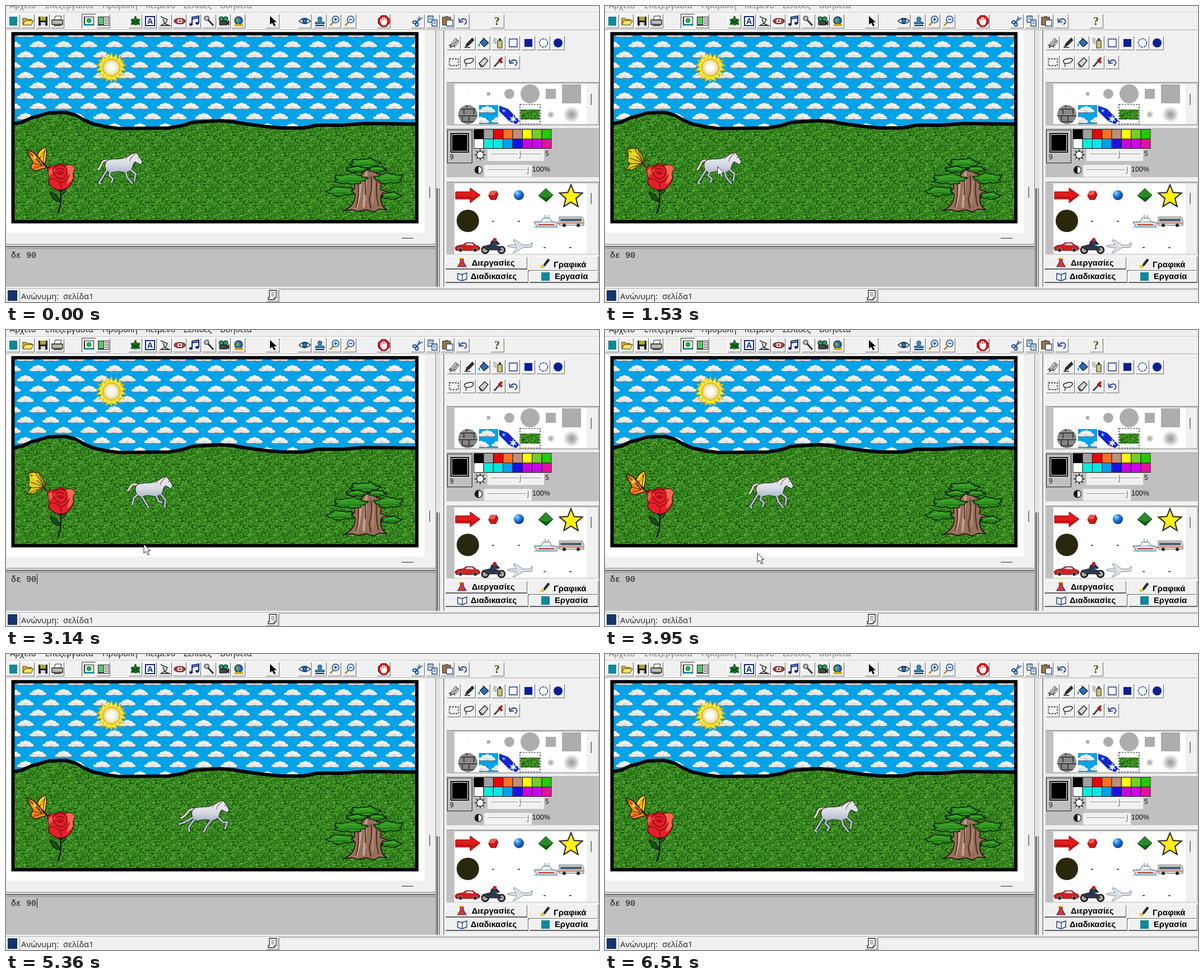
An HTML page with a canvas that plays this animation: 1058x529 px, repeating every 6570 ms.

```html
<!DOCTYPE html>
<html lang="el">
<head>
<meta charset="utf-8">
<title>Meadow</title>
<style>
html, body { margin: 0; width: 100%; height: 100%; overflow: hidden; background: #f0f0f0; }
canvas { display: block; }
</style>
</head>
<body>
<canvas id="stage" width="1058" height="529"></canvas>
<script>
const LOOP = 6570, W = 1058, H = 529;
const sheet = (w, h) => Object.assign(document.createElement('canvas'), { width: w, height: h });
const screen = document.getElementById('stage').getContext('2d');
const base = sheet(W, H);
let g = base.getContext('2d');

// ---------- helpers ----------
let seed = 7;
const rnd = () => (seed = (seed * 16807) % 2147483647) / 2147483647;

function rect(x, y, w, h, c) { g.fillStyle = c; g.fillRect(x, y, w, h); }
function fig(d, fill, line, lw = 1) {
  const p = typeof d === 'string' ? new Path2D(d) : d;
  if (fill) { g.fillStyle = fill; g.fill(p); }
  if (line) { g.strokeStyle = line; g.lineWidth = lw; g.stroke(p); }
}
function oval(x, y, rx, ry, fill, line, lw) {
  const p = new Path2D();
  p.ellipse(x, y, rx, ry, 0, 0, Math.PI * 2);
  fig(p, fill, line, lw);
}
function at(x, y, draw) { g.save(); g.translate(x, y); draw(); g.restore(); }
function text(s, x, y, font, c = '#111') { g.font = font; g.fillStyle = c; g.fillText(s, x, y); }
function bevel(x, y, w, h, down) {
  rect(x, y, w, h, down ? '#404040' : '#ffffff');
  rect(x + 1, y + 1, w - 1, h - 1, down ? '#ffffff' : '#6c6c6c');
  rect(x + 1, y + 1, w - 2, h - 2, '#f0f0f0');
}
function radial(x, y, r, ...stops) {
  const f = g.createRadialGradient(x, y, 0, x, y, r);
  stops.forEach((c, i) => f.addColorStop(i / (stops.length - 1), c));
  return f;
}
function star(x, y, n, r1, r2, fill, line, lw) {
  const p = new Path2D();
  for (let i = 0; i < n * 2; i++) {
    const a = i * Math.PI / n - Math.PI / 2, r = i % 2 ? r2 : r1;
    p.lineTo(x + r * Math.cos(a), y + r * Math.sin(a));
  }
  p.closePath();
  fig(p, fill, line, lw);
}

// ---------- textures ----------
function grassPattern() {
  const tile = sheet(46, 37), c = tile.getContext('2d');
  c.fillStyle = '#2f7f1a';
  c.fillRect(0, 0, 46, 37);
  const tones = ['#0d4204', '#1a5c0c', '#2b7616', '#3f9424', '#58ae36', '#74c44c'];
  for (let y = 0; y < 37; y += 1.4) for (let x = 0; x < 46; x += 1.5) {
    c.fillStyle = tones[Math.floor(rnd() * 6)];
    c.globalAlpha = .75;
    c.fillRect(x, y, 1.5, 1.4);
  }
  return g.createPattern(tile, 'repeat');
}
const grass = grassPattern();

function cloud(x, y) {
  at(x, y, () => {
    fig('M-15 4Q-15 0-10 0Q-9-5-4-4Q0-8 5-4Q9-5 10-1Q15 0 15 4Q8 7 0 5Q-8 7-15 4Z', '#f4f4f4');
    fig('M-11 3Q-8-1-4 2Q1-2 5 2Q9 0 12 3Z', '#dadada');
    fig('M-14 5Q-7 6.5 0 5Q8 6.5 15 5', null, '#7d8488', 1.4);
  });
}
function sky(x0, y0, x1, y1) {
  g.save();
  g.beginPath(); g.rect(x0, y0, x1 - x0, y1 - y0); g.clip();
  rect(x0, y0, x1 - x0, y1 - y0, '#00a2e8');
  for (let r = 0; r < 11; r++) for (let k = -1; k < 18; k++)
    cloud(11.5 + k * 45.4 + (r % 2 ? 0 : 23), 50 + r * 18.4);
  g.restore();
}

// ---------- page picture ----------
function sun() {
  star(188, 110, 18, 27.5, 18, '#ffd400', '#e09a18', .8);
  star(188, 110, 15, 24, 17, '#fff03a');
  oval(188, 110, 16, 16, radial(188, 110, 16, '#ffffff', '#fdfbf0', '#efe6c0', '#e8c020'), '#c89018', .8);
}
function rose() {
  fig('M97 327C98 345 99 355 92 371', null, '#081808', 2.4);
  fig('M96 350Q82 350 78 333Q92 333 96 350Z', '#174d18', '#061006', 1);
  fig('M98 338Q108 332 106 327M91 327Q97 335 104 327', null, '#0c240b', 2);
  fig('M74 292Q76 283 88 286Q97 278 105 285Q118 280 123 291Q118 299 121 306Q116 326 100 329Q83 329 76 316Q79 307 74 292Z', '#e3202a', '#3a0508', 1.2);
  fig('M106 286Q118 280 123 291Q117 298 120 307Q115 317 108 318Q115 302 106 286Z', '#f36a50');
  fig('M75 293Q83 287 88 294Q81 300 77 306Z', '#f4574c');
  fig('M83 291Q98 279 108 290Q111 303 100 309Q87 309 83 291M88 293Q99 287 104 294M77 309Q90 307 97 316Q108 314 114 301M97 316L99 328', null, '#7d0710', 1.4);
  fig('M90 297Q99 292 104 299Q96 306 90 297', '#b80d18');
}
function leaves(x, y, rx, ry, k) {
  const p = new Path2D();
  for (let i = 0; i < 40; i++) {
    const a = i * Math.PI / 20, r = 1 + .12 * Math.sin(5 * a + k) + .1 * Math.sin(11 * a + k * 2);
    p.lineTo(x + rx * r * Math.cos(a), y + ry * r * Math.sin(a));
  }
  p.closePath();
  fig(p, '#2f9420', '#0a1c06', 1.5);
  fig(`M${x - rx * .6} ${y - ry * .1}Q${x} ${y - ry * .9} ${x + rx * .5} ${y - ry * .2}`, null, '#4cb034', 1.6);
  fig(`M${x - rx * .7} ${y + ry * .6}Q${x} ${y + ry * .2} ${x + rx * .7} ${y + ry * .5}`, null, '#1c6414', 1.4);
}
function tree() {
  fig('M601 366C616 361 623 350 623 336L600 330L622 327L622 312L606 308L632 306L643 287L652 287L662 300L672 302L668 328L688 335L669 338C667 350 670 358 679 364L666 363L656 368L643 364L628 367L617 364Z', '#96705c', '#180b06', 1.5);
  fig('M643 295L638 360M633 310Q632 345 624 362', null, '#c8a490', 4);
  fig('M651 303Q655 325 648 345L651 362M628 315Q631 340 624 361M641 305L641 338M662 308Q659 338 665 358', null, '#4a2a20', 1.8);
  fig('M656 313L654 352', null, '#b58872', 3);
  leaves(640, 281, 25, 8, 1);
  leaves(626, 292, 18, 5, 3);
  leaves(662, 292, 15, 5, 0);
  leaves(614, 309, 28, 9, 2);
  leaves(683, 308, 24, 9, 4);
  leaves(597, 331, 23, 8, 5);
  leaves(687, 339, 17, 6, 1.5);
}
function picture() {
  rect(0, 43, 767, 383, '#f0f0f0');
  rect(1, 43, 746, 362, '#ffffff');
  sky(12, 50, 733, 235);
  const hill = 'M12 211L30 207L45 200L60 196L76 191L106 190L124 195L140 204L156 211L180 216L202 219L290 218L314 214L332 208L380 205L406 207L430 211L460 215L490 218L530 218L556 213L600 213L640 210L733 211';
  g.lineJoin = 'round';
  fig(hill + 'V386H12Z', grass);
  fig(hill, null, '#000', 6);
  g.lineJoin = 'miter';
  g.strokeStyle = '#000'; g.lineWidth = 6;
  g.strokeRect(12.5, 49.5, 720.5, 336);
  sun(); rose(); tree();
}

// ---------- window parts ----------
const glyph = {
  mark: () => rect(-7, -8, 14, 16, '#108898'),
  open: () => { fig('M-9-5H-3L-1-3H6V6H-9Z', '#e8b820', '#403000'); fig('M-9 7L-5-1H10L6 7Z', '#ffe468', '#403000'); },
  save: () => { rect(-8, -8, 16, 16, '#202020'); rect(-5, -8, 10, 7, '#a8a820'); rect(-4, 2, 8, 6, '#d8d8d8'); },
  print: () => { fig('M-6-2L-4-9H7L5-2Z', '#fff', '#222'); fig('M-10-2H9V6H-10Z', '#b8b8b8', '#222', 1.4); rect(-7, 6, 14, 3, '#555'); rect(3, 1, 4, 2, '#dd0'); },
  view: () => { rect(-9, -8, 18, 16, '#222'); rect(-7, -7, 15, 13, '#fff'); oval(0, -1, 4, 4, '#25b13d', '#085', 1); rect(-8, 5, 16, 3, '#2090a0'); },
  list: () => { rect(-10, -8, 20, 16, '#222'); rect(-9, -7, 9, 13, '#59c26a'); rect(1, -7, 8, 14, '#fff'); for (let y = -5; y < 6; y += 3) rect(2, y, 6, 1, '#333'); },
  turtle: () => { oval(0, 1, 7, 6, '#197c1e', '#052', 1); fig('M-8-3L8 6M8-3L-8 6M0-4V-9', null, '#0d5012', 3); },
  word: () => { fig('M-8-8H8V8H-8Z', '#fff', '#102a80', 2); text('A', -5, 5, 'bold 14px "Liberation Sans",sans-serif', '#102a80'); },
  lamp: () => fig('M-8-8L4-3L0 5L8 8H-8L-1 4L-4-4', '#d8e8d8', '#222', 1.4),
  pill: () => { oval(0, 0, 10, 5, '#c83838', '#222', 1.2); rect(-4, -3, 8, 6, '#eee'); rect(-2, -1, 4, 2, '#222'); },
  note: () => { fig('M-4 6V-7L8-9V4M-4-4L8-6', null, '#102a80', 2); oval(-6, 6, 3, 2.4, '#102a80'); oval(5, 4, 3, 2.4, '#102a80'); },
  mic: () => { fig('M-3-3L7 8', null, '#333', 3); oval(-5, -5, 4, 4, '#bbb', '#222', 1.2); },
  film: () => { fig('M-8-1H5V7H-8ZM5 2L9-1V7L5 5Z', '#444', '#111'); oval(-5, -4, 4, 4, '#20a060', '#111'); oval(3, -4, 4, 4, '#20a060', '#111'); },
  globe: () => { oval(0, -1, 7, 7, '#2b68c4', '#113', 1.2); fig('M-4-6Q4-4 1 1Q-3 5-5 0Z', '#55b23b'); rect(-7, 5, 15, 4, '#d0a820'); },
  arrow: () => fig('M-5-9V6L-1 3L2 9L5 8L2 2H7Z', '#000'),
  eye: () => { fig('M-10 0Q0-10 10 0Q0 9-10 0Z', '#e8f4ff', '#123', 1.4); oval(0, -.5, 4, 4, '#2878c0', '#012'); },
  stamp: () => { fig('M-3 2Q-2-2-4-5Q0-10 4-5Q2-2 3 2H8V5H-8V2Z', '#2c8cc8', '#135'); rect(-8, 7, 16, 2, '#135'); },
  zoomIn: () => { glyph.zoomOut(); fig('M2-6V0', null, '#234a90', 1.6); },
  zoomOut: () => { fig('M0 0L-8 8', null, '#b88a30', 3); oval(2, -3, 6, 6, '#d8f0ff', '#234a90', 1.6); fig('M-1-3H5', null, '#234a90', 1.6); },
  stop: () => { fig('M-4-10H4L10-4V4L4 10H-4L-10 4V-4Z', '#d81818', '#500', 1); fig('M-5 0V-4M-2 0V-7M1 0V-7M4 0V-5M-5 0Q-4 7 0 7Q5 7 5-1Z', '#fff', '#fff', 2); },
  cut: () => { fig('M8-6L-4 2M3-8L-2 4', null, '#2862a8', 2); oval(-6, 2, 3, 2.5, null, '#205090', 2); oval(-2, 6, 2.5, 3, null, '#205090', 2); },
  copy: () => { for (const k of [-4, 3]) { fig(`M${k - 5} ${k - 5}h9v11h-9z`, '#e6f4ff', '#1c407c', 1.3); fig(`M${k - 3} ${k - 2}h5m-5 3h5`, null, '#1c407c'); } },
  paste: () => { fig('M-9-7H5V7H-9Z', '#a87838', '#222', 1.2); rect(-5, -9, 6, 4, '#666'); fig('M-2-2H9V9H-2Z', '#fff', '#1c407c', 1.3); },
  undo: () => fig('M-7-5L-6 2L1 1M-5 0Q-1-6 5-3Q9 2 3 6', null, '#203c98', 1.8),
  help: () => text('?', -6, 7, 'bold 20px "Liberation Serif",serif', '#4a4a08'),
  brush: () => { fig('M-9 5Q-4 2-6 8Q0 3 2 8', null, '#222', 1.4); fig('M-6 3L3-8L6-6L-3 4ZM0 4L7-5L9-3L3 5Z', '#ddd', '#222'); },
  pen: () => { fig('M-6 7L-4 1L6-9L9-5L0 4Z', '#333', '#111'); fig('M-8 8H2', null, '#111', 1.4); },
  fill: () => { fig('M-6-1L1-8L9 0L1 7Z', '#2870b8', '#113', 1.2); fig('M-7 0Q-11 4-8 7Q-5 4-7 0', '#18a0e0'); fig('M-1-4V-10', null, '#222'); },
  spray: () => { fig('M-2-4H6V9H-2Z', '#c8c870', '#333', 1.2); rect(0, -8, 4, 4, '#333'); for (let i = 0; i < 6; i++) rect(-9 + i % 2 * 3, -9 + i * 1.7, 1.5, 1.5, '#333'); },
  box: () => fig('M-7-7H7V7H-7Z', '#f8f8ff', '#1830a0', 1.3),
  slab: () => rect(-7, -7, 14, 14, '#0b2090'),
  ring: () => { g.setLineDash([4, 1.5]); oval(0, 0, 7.5, 7.5, '#f4f8ff', '#1830a0', 1.4); g.setLineDash([]); },
  disc: () => oval(0, 0, 8, 8, '#0b2090'),
  pick: () => { g.setLineDash([3, 2]); fig('M-8-6H8V6H-8Z', null, '#111', 1.3); g.setLineDash([]); },
  lasso: () => fig('M-6 8Q-3 3-7 1Q-11-4-2-6Q9-9 8-3Q5 3-6 2', null, '#222', 1.4),
  rubber: () => fig('M-8 2L2-8L8-3L-1 8H-5ZM-8 2L-2 7', '#d4d4d4', '#222', 1.3),
  dropper: () => { fig('M-8 8L2-3', null, '#444', 3); fig('M0-5L6 1M2-3L6-8', null, '#b01818', 4); }
};
function buttons(y, h, list) {
  for (const [x, name] of list) {
    bevel(x, y, 25, h, name === 'view');
    at(x + 13, y + h / 2, glyph[name]);
  }
}
const row = (x, step, names) => names.split(' ').map((n, i) => [Math.round(x + i * step), n]);

function toolbar() {
  rect(0, 11, W, 1, '#c4c4c4');
  rect(0, 12, W, 1, '#ffffff');
  buttons(14, 26, [
    ...row(0, 26.3, 'mark open save print'), ...row(135, 26.3, 'view list'),
    ...row(218, 26.3, 'turtle word lamp pill note mic film globe'), [463, 'arrow'],
    ...row(520, 26.7, 'eye stamp zoomIn zoomOut'), [661, 'stop'],
    ...row(722, 26.5, 'cut copy paste undo'), [864, 'help']]);
  rect(0, 42, W, 1, '#a8a8a8');
}
function frameLines() {
  rect(706, 414, 21, 2, '#858585');
  rect(755, 323, 2, 20, '#858585');
  rect(0, 425, 767, 77, '#c0c0c0');
  rect(0, 425, 767, 1, '#9a9a9a');
  rect(0, 427, 767, 1, '#f4f4f4');
  rect(0, 429, 767, 2, '#6c6c6c');
  rect(0, 433, 767, 1, '#8a8a8a');
  rect(766, 43, 1, 459, '#858585');
  rect(767, 43, 8, 459, '#e4e4e4');
  rect(768, 326, 6, 176, '#c0c0c0');
  rect(768, 326, 2, 176, '#555');
  rect(773, 326, 1, 176, '#6c6c6c');
  rect(780, 43, 2, 459, '#9a9a9a');
  rect(0, 502, W, 2, '#fafafa');
}
function brushes() {
  rect(786, 136, 272, 78, '#c0c0c0');
  rect(786, 136, 272, 1, '#8a8a8a');
  rect(800, 139, 236, 72, '#fff');
  rect(1036, 139, 20, 72, '#f0f0f0');
  rect(1043, 157, 2, 20, '#858585');
  const c = '#adadad';
  rect(824, 156, 1, 1, c); rect(858, 154, 6, 6, c);
  oval(898, 157, 9, 9, c); oval(935, 157, 17, 17, c);
  rect(963, 148, 18, 18, c); rect(992, 140, 34, 34, c);
  g.save();
  oval(824, 194, 17, 17, '#858585');
  g.beginPath(); g.arc(824, 194, 17, 0, 7); g.clip();
  fig('M806 184H842M806 196H842M806 207H842M817 184V196M835 184V196M826 196V207M814 196V207M822 176V184', null, '#3e3e3e', 2);
  fig('M806 182H842M806 194H842', null, '#b5b5b5', 1);
  g.restore();
  rect(844, 177, 34, 34, '#00a2e8');
  g.save(); g.beginPath(); g.rect(844, 177, 34, 34); g.clip();
  cloud(858, 185); cloud(881, 203); cloud(847, 204); g.restore();
  fig('M880 178L896 184L916 205L910 211L898 206L880 188Z', '#1424c8');
  star(905, 202, 6, 8, 3, '#dff4ff'); star(888, 187, 5, 4, 2, '#5faef4');
  at(918, 185, () => fig('M0 0H34V18H0Z', grass));
  g.setLineDash([3, 2]);
  fig('M917 176H953V211H917Z', null, '#111', 1.2);
  g.setLineDash([]);
  oval(972, 194, 7, 7, radial(972, 194, 7, '#a0a0a0', '#c8c8c8', '#fff'));
  oval(1009, 194, 15, 15, radial(1009, 194, 15, '#969696', '#c4c4c4', '#fff'));
}
function slider(x, y, w, knob) {
  rect(x, y, w, 21, '#f0f0f0');
  rect(x + 6, y + 8, w - 11, 1, '#8d8d8d');
  rect(x + 6, y + 9, w - 11, 1, '#fff');
  bevel(knob - 2, y + 2, 4, 14);
}
function colours() {
  rect(786, 218, 272, 88, '#c0c0c0');
  rect(787, 221, 45, 60, '#202020');
  rect(788, 222, 43, 58, '#c0c0c0');
  rect(793, 227, 33, 35, '#111'); rect(795, 229, 29, 31, '#fff'); rect(796, 230, 27, 29, '#000');
  text('9', 792, 274, '12px "Liberation Sans",sans-serif');
  const tint = '#000 #a0a0a0 #ee0000 #ff7020 #c08e78 #ffff00 #70d028 #20cc00 #fff #00f0e0 #00e8e8 #009ff0 #1a10e8 #c800e0 #d000f0 #e810a0'.split(' ');
  rect(834.5, 220, 139, 35, '#222');
  tint.forEach((c, i) => rect(835.5 + i % 8 * 17.3, 221 + (i > 7 ? 17 : 0), 16, 16, c));
  star(846, 266, 8, 11, 5, '#222'); oval(846, 266, 6, 6, '#fff', '#222', 1);
  oval(843, 293, 6.5, 6.5, '#fff', '#111', 1.3);
  fig('M843 287A6 6 0 0 0 843 299Z', '#111');
  slider(859, 256, 101, 916); slider(853, 284, 85, 930);
  text('5', 962, 268, '12px "Liberation Sans",sans-serif');
  text('100%', 939, 296, '12.4px "Liberation Sans",sans-serif');
}
function shapes() {
  rect(786, 314, 272, 130, '#c0c0c0');
  rect(786, 314, 272, 1, '#8a8a8a');
  rect(800, 317, 236, 126, '#fff');
  rect(1036, 317, 20, 126, '#f0f0f0');
  rect(1043, 334, 2, 20, '#858585');
  fig('M802 332H828V325L846 338L828 352V345H802Z', '#e11b1b', '#8a0b0b', 1);
  fig('M803 342H829V347L842 339', null, '#a90f0f', 2);
  fig('M865 331H875L878 337L874 346H865L861 339Z', '#d01818', '#600', 1);
  fig('M865 331H875L871 338H862Z', '#f05c50');
  oval(915, 338, 9, 9, radial(912, 334, 12, '#9cd8ff', '#2080e8', '#1040a0'));
  fig('M963 326L976 338L964 350L950 339Z', '#2b8a2b', '#174d17', 1);
  fig('M950 339L964 350L976 338L964 343Z', '#145a18');
  star(1008, 341, 5, 21.5, 9.5, '#ffee18', '#222', 2);
  oval(824, 384, 20, 20, '#29280f');
  for (const [x, y] of [[867, 384], [913, 384], [959, 431], [1005, 431]]) rect(x, y, 4, 1.5, '#222');
  // boat and bus
  fig('M942 386L974 385L986 388L980 395H948Z', '#d4dde2', '#3a5060', 1);
  fig('M955 386L958 379H970L974 385M962 379V373M966 379L969 374', '#eef3f5', '#506878', 1);
  rect(950, 390, 28, 2, '#b83828'); fig('M942 395H985', null, '#66a8d0', 1.5);
  fig('M987 377H1028L1031 383V392H987Z', '#e2dad2', '#606060', 1);
  rect(989, 380, 38, 5, '#50697c'); rect(988, 387, 42, 1.5, '#c05838');
  for (const x of [996, 1021]) oval(x, 392, 3, 3, '#222');
  // car, motorcycle and plane
  fig('M801 432Q805 427 815 427L821 423H833L839 428Q846 429 846 434L842 437H803Z', '#d02020', '#500c0c', 1);
  fig('M819 427L823 424H832L835 428Z', '#c2d6e0');
  for (const x of [811, 837]) oval(x, 436, 3.4, 3.4, '#222', '#aaa');
  for (const x of [855, 884]) oval(x, 436, 6, 6, '#aaa', '#181818', 2.5);
  fig('M850 430L862 427L878 429L884 436H858Z', '#303848', '#111', 1);
  fig('M864 430L867 421L873 419L880 426', '#24406a', '#202838', 3);
  oval(872, 418, 3.5, 3.5, '#c02020');
  fig('M894 429Q898 426 910 427L905 418H909L922 427H934L939 422L938 431L922 432L908 441H904L912 432Q899 432 894 429Z', '#dde2e6', '#7c8890', 1);
}
function tab(x, y, w, h, label, lx, by) {
  bevel(x, y, w, h);
  rect(x, y + h, w, 1, '#555');
  text(label, lx, by, 'bold 14.7px "Liberation Sans",Arial,sans-serif', '#000');
}
function tabs() {
  tab(784, 448, 146, 22, 'Διεργασίες', 831, 464);
  tab(931, 447, 126, 26, 'Γραφικά', 977, 467);
  tab(784, 472, 148, 22, 'Διαδικασίες', 829, 488);
  tab(934, 473, 123, 21, 'Εργασία', 979, 488);
  fig('M810 451H816V457L821 466H806L811 457Z', '#e83030', '#203070', 1.2);
  rect(809, 450, 8, 2, '#f0c020');
  fig('M957 468L960 461L967 452L970 454L963 463Z', '#333', '#111'); rect(954, 463, 6, 5, '#e8c820');
  fig('M806 478L814 480L822 477V488L814 491L806 489ZM814 480V491', '#fff', '#183880', 1.4);
  rect(955, 476, 15, 15, '#108898');
}
function status() {
  rect(0, 504, W, 25, '#f0f0f0');
  rect(0, 504, W, 1, '#a8a8a8');
  rect(3, 508, 17, 19, '#15356c');
  rect(24, 506, 1, 23, '#a0a0a0');
  const font = '14.6px "Open Sans","Noto Sans",sans-serif';
  text('Ανώνυμη:', 27, 524, font, '#222');
  text('σελίδα1', 102, 524, font, '#222');
  bevel(463, 506, 23, 23);
  fig('M470 508H482V521L478 525H468V521H470Z', '#fff', '#222', 1.3);
  fig('M473 512H479M473 515H479M473 518H479M478 525V521H482', null, '#444', 1);
  rect(487, 506, 1, 23, '#909090'); rect(488, 506, 570, 1, '#909090');
}
function scene() {
  rect(0, 0, W, H, '#f0f0f0');
  toolbar(); picture(); frameLines();
  buttons(53, 26, row(786, 26.6, 'brush pen fill spray box slab ring disc'));
  buttons(88, 25, row(786, 26.6, 'pick lasso rubber dropper undo'));
  brushes(); colours(); shapes(); tabs(); status();
  text('δε 90', 9, 450, '15px "Liberation Mono","Courier New",monospace', '#111');
}

// ---------- moving parts ----------
const strides = [
  ['M182 290L174 303L166 316L169 318', 'M188 292L184 303L191 309L188 315', 'M213 294L216 306L225 317', 'M221 291L231 300L229 312'],
  ['M182 293L174 300L171 312', 'M186 294L194 307L200 317', 'M220 291L230 303L229 317', 'M213 294L218 306L224 308'],
  ['M181 291L163 301L154 304', 'M183 293L171 310L172 317', 'M214 294L203 308L198 318', 'M220 289L233 301L240 300L236 312']
];
const tails = ['M181 276C168 275 173 284 165 292', 'M181 277C168 272 169 282 163 287', 'M181 277C169 276 170 288 158 293'];
const body = new Path2D('M178 280C182 272 195 275 208 273C216 270 219 266 226 264L232 262L235 266L238 270L243 279L240 283L236 281L231 278C227 280 226 284 225 289C222 296 212 299 206 296C198 294 193 296 187 298C180 296 175 289 178 280Z');
const coat = g.createLinearGradient(0, 264, 0, 300);
[['0', '#ececf0'], ['.5', '#d8dce4'], ['1', '#a9b2c2']].forEach(([k, c]) => coat.addColorStop(+k, c));

function horse(step) {
  const k = step % 3;
  at(step * 7.74, 0, () => {
    g.lineJoin = g.lineCap = 'round';
    fig(tails[k], null, '#3c2822', 4.4);
    fig(tails[k], null, '#efe2d8', 3);
    for (const leg of strides[k]) fig(leg, null, '#15171d', 4.8);
    fig(body, null, '#15171d', 1.8);
    for (const leg of strides[k]) fig(leg, null, '#b8c1cf', 3.2);
    fig(body, coat);
    fig('M232 263Q222 264 213 273M230 265Q222 270 221 277', null, '#7c5148', 1.2);
    fig('M228 265Q221 267 218 272', null, '#fff', 1.6);
    rect(235, 270, 1.5, 1.5, '#111');
    g.lineJoin = 'miter'; g.lineCap = 'butt';
  });
}
function butterfly(folded) {
  if (folded) {
    fig('M40 256L48 254L58 255Q66 262 70 279L62 286Q52 291 47 293L38 292L45 281L40 279Q43 268 40 256Z', '#e2cc20', '#332a04', 1.3);
    fig('M43 258L68 280L44 272M53 255L68 280L42 291M46 282L68 281L54 288M59 257L68 279', null, '#4c3e05', 1.2);
    fig('M47 262Q52 265 55 268', null, '#fff35a', 2);
    fig('M71 277Q71 267 77 263M72 278Q75 272 79 271', null, '#2a1606', 1);
  } else {
    fig('M55 278Q53 260 70 252Q75 262 69 284Z', '#f5d422', '#2c1405', 1.5);
    fig('M38 258Q54 260 66 282L73 289Q61 292 55 294Q47 296 44 287L48 279Q41 269 38 258Z', '#ef8a1c', '#2c1405', 1.6);
    fig('M41 261L65 285L48 281M65 285L48 291M59 274L69 258L66 279M53 266L63 284', null, '#522008', 1.2);
    oval(51, 271, 3, 3, '#ffd436'); oval(53, 288, 3, 2.5, '#f04818'); oval(64, 267, 2.3, 5, '#f7a01e');
    fig('M73 289L80 289M74 290L77 295', null, '#2a1606', 1);
  }
  fig('M65 279L73 288', null, '#2a1606', 2.6);
}
function pointer(x, y) {
  at(x, y, () => fig('M0 0V16L4 12.5L7 19L9.5 18L6.8 11.5H11.5Z', '#fff', '#222', 1));
}
function menu(active) {
  const names = [['Αρχείο', 7], ['Επεξεργασία', 70], ['Προβολή', 172], ['Κείμενο', 249], ['Σελίδες', 317], ['Βοήθεια', 382]];
  for (const [s, x] of names) text(s, x, 4, '14.5px "Open Sans","Noto Sans",sans-serif', active ? '#111' : '#777');
}

// ---------- timing ----------
function mix(rows, t) {
  if (t <= rows[0][0]) return rows[0].slice(1);
  for (let i = 1; i < rows.length; i++) {
    const a = rows[i - 1], b = rows[i];
    if (t < b[0]) return a.slice(1).map((v, k) => v + (b[k + 1] - v) * (t - a[0]) / (b[0] - a[0]));
  }
  return rows[rows.length - 1].slice(1);
}
const walk = [[2019, 0], [2020, 1], [3210, 8], [4700, 17], [5230, 20], [5580, 22], [5980, 24], [6510, 27]];
const route = [[310, 770, 515], [500, 640, 498], [800, 262, 392], [940, 208, 335], [1400, 201, 287], [2100, 201, 287],
  [2800, 246, 383], [3400, 246, 383], [3900, 272, 399], [4020, 272, 399], [4350, 735, 535]];
const flaps = [70, 110, 310, 380, 560, 620, 800, 860, 1010, 1080, 1270, 1330, 1530, 1670, 1810, 1870];

function draw(t) {
  g.drawImage(base, 0, 0);
  const active = t >= 2020 && t < 6510;
  menu(active);
  butterfly(t < 2020 ? flaps.filter(f => f <= t).length % 2 : t < 6510 && (t - 2020) % 216 < 71);
  horse(Math.floor(mix(walk, t)[0] + 1e-6));
  if (active && t >= 2050 && Math.floor((t - 2050) / 530) % 2 === 0) rect(55, 436, 1, 18, '#111');
  if (t >= 310 && t < 4350) pointer(...mix(route, t));
}

scene();
g = screen;
const start = performance.now();
function tick() {
  draw((performance.now() - start) % LOOP);
  requestAnimationFrame(tick);
}
tick();
</script>
</body>
</html>
```
